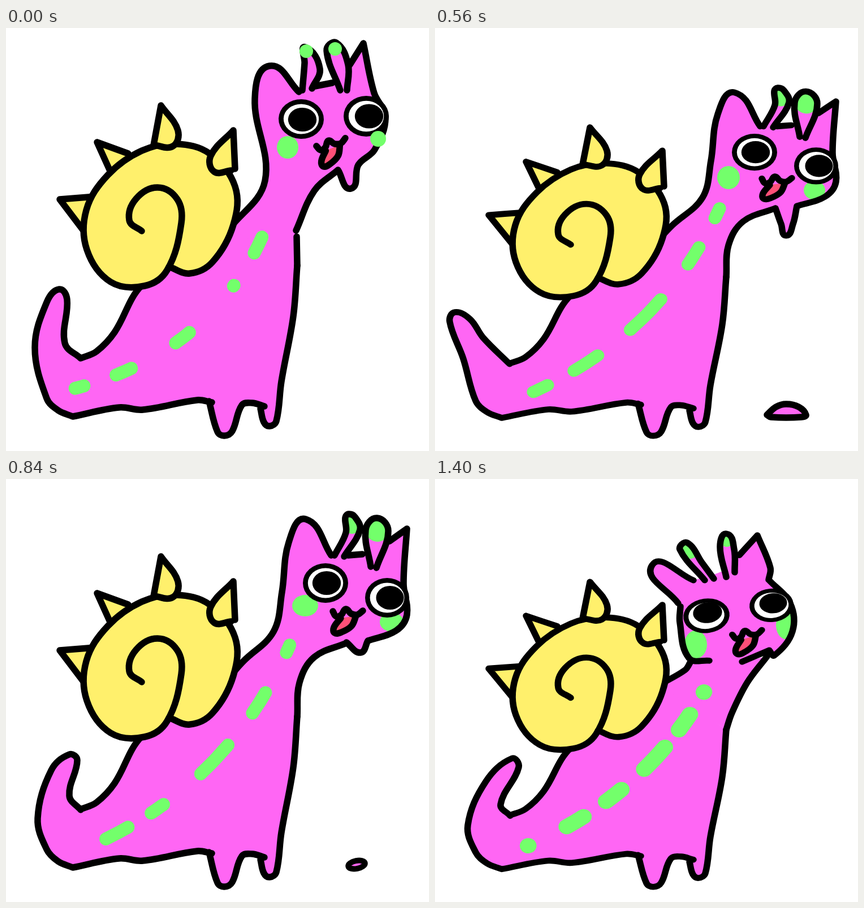
An HTML page with a canvas that plays this animation: 748x748 px, repeating every 1680 ms.

```html
<!DOCTYPE html>
<html lang="en">
<head>
<meta charset="utf-8">
<title>Snail cat</title>
<style>
  html, body { margin: 0; width: 100%; height: 100%; overflow: hidden; background: #fff; }
  canvas { display: block; width: 748px; height: 748px; }
</style>
</head>
<body>
<canvas id="stage" width="748" height="748"></canvas>
<script>
const ctx = document.getElementById('stage').getContext('2d');
const PINK = '#ff66f4', YELLOW = '#fff06c', GREEN = '#73ff6b', RED = '#ff5078', INK = '#000';
const STEP = 280, GROUND = 724, LINE = 11.5;

// Outlines are key points joined by smooth curves; "|" starts a new curve.
const back = '395,330 240,455 192,538 160,572 132,584';
const belly = '118,687 200,671 242,675 338,658 364,662' +
  '|359,660 374,714 386,721 400,713 417,667 435,663 457,669' +
  '|450,673 456,697 466,704 478,695 487,625 508,510 515,420';
const rump = ' 72,655 92,676 118,687';
const tails = {
  up: '132,584 104,557 108,480 94,462 72,485 51,565',
  out: '132,585 85,535 62,500 35,487 26,505 50,575',
  hook: '132,585 112,560 126,497 112,487 80,515 56,600',
  bent: '132,585 75,515 50,504 40,522 60,555|60,555 59,610',
  curl: '133,585 116,563 148,492 136,475 90,519 58,603'
};

const shell = '240,359 218,340 230,302 268,282 303,303 310,345 285,428 245,456 185,449 143,392 ' +
  '142,322 180,260 240,217 300,205 360,222 405,280 402,348 365,414 325,434 288,422';
const rearSpikes = ['136,357 95,303|95,303 158,298', '185,255 161,202|161,202 216,222'];
const frontSpikes = [
  '261,207 274,137|274,137 304,181 295,209 261,207',
  '402,181 362,226 368,254 398,252|405,249 402,181'
];

// Mouth and tongue are drawn around the middle of the mouth.
const mouth = '-27,-4 -21,5 -12,2 -4,-8 5,0 16,2 26,-5';
const tongue = '-13,8 -25,24 -24,34 -12,33 6,22 14,4';

const frontB = '395,350 420,322 473,270 488,200 500,112 530,71 575,135' +
  '|605,135 630,133|678,110 709,88|709,88 703,185 709,240 690,268 640,286|';
const chinB = '602,290 545,315 519,360 515,420';
const faceB = {
  feelers: [
    ['581,135 601,95 600,68 606,62 617,67 626,90 598,137', [612, 82, 17, 15]],
    ['645,155 636,90 656,69 676,92 655,157', [657, 92, 20, 19]]
  ],
  eyes: [[565, 184, 40, 35, 2, 0], [674, 210, 39, 35, 5, 0]],
  mouth: [605, 238, 0]
};

// Eyes are x, y, radii, then how far the pupil looks aside.
const heads = {
  tall: {
    outline: '395,355 458,270 440,125 466,67 518,113|541,104 577,97|608,65 632,27' +
      '|632,27 651,115 671,158 652,215 623,242 610,284 587,251|587,251 545,288 513,358|514,369 515,420',
    feelers: [
      ['524,110 528,62 529,34 555,72 541,107'],
      ['591,110 567,40 584,26 605,65 603,110']
    ],
    eyes: [[522, 161, 40, 35, 2, 1], [637, 156, 40, 36, 5, 0]],
    mouth: [576, 206, -.25],
    dots: [[531, 41, 12, 12], [582, 37, 12, 12], [658, 196, 14, 14]]
  },
  drip: { ...faceB, outline: frontB + '640,286 633,320 621,342 612,320 602,290|' + chinB },
  short: { ...faceB, outline: frontB + '640,286 627,307 602,289|' + chinB },
  away: {
    outline: '395,335 442,306 452,290|485,288 449,283 433,215 434,184' +
      '|430,178 384,105 457,134|493,123|510,116|538,86 570,48|570,48 593,110 590,133' +
      '|590,133 628,178 632,232 600,278 591,268|591,268 543,290|587,280 552,330 525,388 515,420',
    feelers: [
      ['477,134 433,75 446,62 472,100 493,131', [449, 78, 17, 15]],
      ['515,128 504,70 516,45 529,75 530,119', [516, 56, 12, 14]]
    ],
    eyes: [[480, 202, 41, 33, 2, -6], [595, 182, 39, 32, 3, -4]],
    mouth: [553, 238, -.15]
  }
};

const drop = (x, y, rx, ry, tilt) => () => oval([x, y, rx, ry, tilt], PINK, 10);
const puddle = () => shape('587,684 603,670 621,665 643,670 656,684 648,688 594,688 587,684', PINK);

// Spots are stretches along the spine, from the neck towards the tail.
const poses = [
  { head: 'tall', tail: 'up', bend: 8, cheeks: [[498, 211, 19, 20]],
    spots: '-83,-41 52,54 214,257 380,419 495,515' },
  { head: 'drip', tail: 'out', cheeks: [[530, 229, 23, 22], [684, 252, 22, 18]],
    spots: '-251,-201 -108,-50 74,127 216,312 399,461', extra: drop(627, 417, 15.5, 13.5) },
  { head: 'drip', tail: 'out', squash: .934, cheeks: [[519, 232, 20, 22], [671, 256, 19, 18]],
    spots: '-213,-186 -103,-51 63,175 281,352 426,464', extra: puddle },
  { head: 'short', tail: 'hook', cheeks: [[529, 224, 23, 19], [682, 253, 21, 17]],
    spots: '-208,-189 -81,-22 78,177 297,334 400,460', extra: drop(620, 682, 15, 7, -.2) },
  { head: 'away', tail: 'bent', spot: 29, cheeks: [[463, 257, 22, 25], [622, 224, 21, 25]],
    spots: '-112,-85 -2,60 170,205 297,375 451,485' },
  { head: 'away', tail: 'curl', squash: .9236, spot: 29, cheeks: [[461, 257, 20, 27], [621, 220, 18, 27]],
    spots: '-128,-127 -60,-11 47,126 205,255 324,373 477,478' }
];

const pairs = text => text.split(' ').map(p => p.split(',').map(Number));

// Catmull-Rom through the points; joined curves make one fillable area.
function trace(data, joined) {
  const path = new Path2D();
  data.split('|').forEach((part, n) => {
    const pts = pairs(part);
    path[joined && n ? 'lineTo' : 'moveTo'](...pts[0]);
    for (let i = 0; i < pts.length - 1; i++) {
      const a = pts[i - 1] || pts[i], b = pts[i], c = pts[i + 1], d = pts[i + 2] || c;
      // Handles follow the length of their own piece, so uneven points stay smooth.
      const size = Math.hypot(c[0] - b[0], c[1] - b[1]) * .36;
      const ab = Math.hypot(c[0] - a[0], c[1] - a[1]) || 1;
      const cd = Math.hypot(d[0] - b[0], d[1] - b[1]) || 1;
      path.bezierCurveTo(
        b[0] + (c[0] - a[0]) / ab * size, b[1] + (c[1] - a[1]) / ab * size,
        c[0] - (d[0] - b[0]) / cd * size, c[1] - (d[1] - b[1]) / cd * size, c[0], c[1]);
    }
  });
  return path;
}

function line(data, color = INK, width = LINE) {
  ctx.strokeStyle = color;
  ctx.lineWidth = width;
  ctx.stroke(trace(data));
}

function oval([x, y, rx, ry, tilt = 0], color, border) {
  ctx.beginPath();
  ctx.ellipse(x, y, rx, ry, tilt, 0, Math.PI * 2);
  ctx.fillStyle = color;
  ctx.fill();
  if (border) {
    ctx.strokeStyle = INK;
    ctx.lineWidth = border;
    ctx.stroke();
  }
}

// Fills an outline, paints green marks inside it, then inks the edge.
function shape(data, color, marks = []) {
  const area = trace(data, true);
  ctx.fillStyle = color;
  ctx.fill(area);
  ctx.save();
  ctx.clip(area);
  marks.forEach(m => oval(m, GREEN));
  ctx.restore();
  line(data);
}

function eye([x, y, rx, ry, dx, dy]) {
  const tilt = dy * .025;
  oval([x, y, rx, ry, tilt], INK);
  oval([x, y, rx * .78, ry * .76, tilt], '#fff');
  oval([x + dx, y + dy, rx * .63, ry * .6, tilt], INK);
}

// The spine is a shallow parabola along the falling diagonal.
function spine(u, bend) {
  const v = 866 - bend * 1e-4 * (u - 150) ** 2;
  return (v - u) / 2 + ',' + (v + u) / 2;
}

function draw({ head: name, tail, squash = 1, bend = 5.5, spot = 23, cheeks, spots, extra }) {
  const head = heads[name];
  ctx.clearRect(0, 0, 748, 748);
  ctx.save();
  ctx.translate(0, GROUND);
  ctx.scale(1, squash);
  ctx.translate(0, -GROUND);

  shape([back, tails[tail] + rump, belly].join('|'), PINK);
  shape(head.outline, PINK, cheeks);
  for (const [from, to] of pairs(spots)) {
    const points = [from, (from + to) / 2, to].map(u => spine(u, bend));
    line(points.join(' '), GREEN, spot);
  }

  head.feelers.forEach(([edge, tip]) => shape(edge, PINK, tip && [tip]));
  head.eyes.forEach(eye);

  ctx.save();
  ctx.translate(head.mouth[0], head.mouth[1]);
  ctx.rotate(head.mouth[2]);
  shape(tongue, RED);
  line(mouth);
  ctx.restore();
  (head.dots || []).forEach(d => oval(d, GREEN));

  rearSpikes.forEach(s => shape(s, YELLOW));
  shape(shell, YELLOW);
  frontSpikes.forEach(s => shape(s, YELLOW));
  ctx.restore();
  if (extra) extra();
}

ctx.lineCap = ctx.lineJoin = 'round';
const start = performance.now();
let shown = -1;
function tick() {
  const now = Math.floor((performance.now() - start) / STEP) % poses.length;
  if (now !== shown) draw(poses[shown = now]);
  requestAnimationFrame(tick);
}
tick();
</script>
</body>
</html>
```
